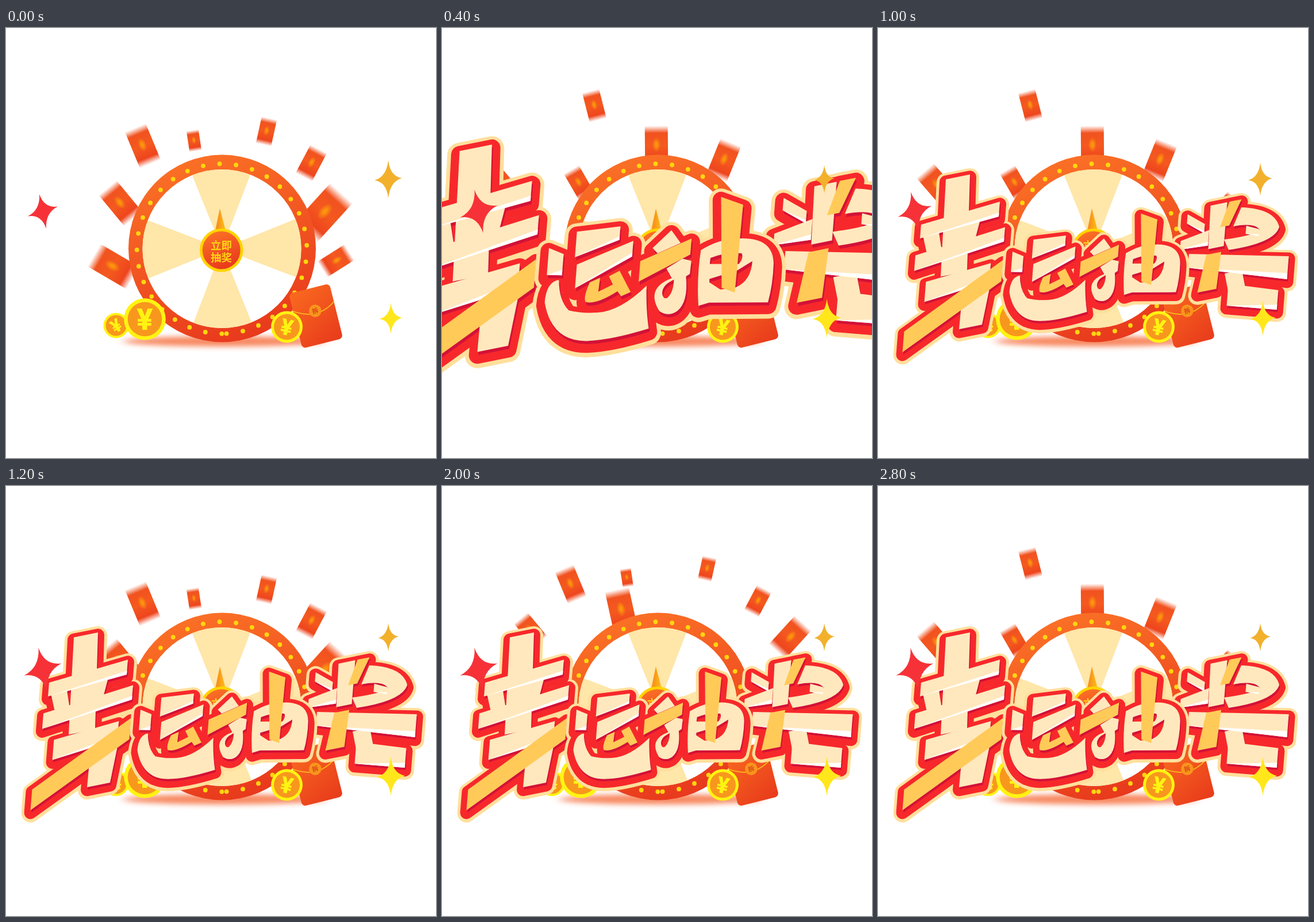
An HTML page for the animation above (3 s loop, 748 by 748 pixels).

```html
<!DOCTYPE html>
<html lang="zh">
<head>
<meta charset="utf-8">
<title>幸运抽奖</title>
<style>
html, body { margin: 0; width: 100%; height: 100%; overflow: hidden; background: #fff; }
svg { display: block; width: 100vw; height: 100vh; }
text { text-anchor: middle; }
.cjk { font-family: "Noto Sans CJK SC", "Noto Sans CJK", sans-serif; font-weight: 700; }
.yen { font-family: Inter, Roboto, sans-serif; font-weight: 800; fill: #fff312; }
</style>
</head>
<body>
<svg viewBox="0 0 748 748">
  <defs>
    <linearGradient id="ring" x1=".25" y1="0" x2=".6" y2="1">
      <stop offset="0" stop-color="#fb7226"/><stop offset="1" stop-color="#e8391d"/>
    </linearGradient>
    <linearGradient id="packet" x1=".3" y1="0" x2=".7" y2="1">
      <stop offset="0" stop-color="#f8661f"/><stop offset="1" stop-color="#e93e1c"/>
    </linearGradient>
    <linearGradient id="blurred" x1="0" y1="0" x2="0" y2="1">
      <stop offset="0" stop-color="#f1521f" stop-opacity="0"/>
      <stop offset=".18" stop-color="#f1521f"/>
      <stop offset=".5" stop-color="#f4591f"/>
      <stop offset=".82" stop-color="#ee451d"/>
      <stop offset="1" stop-color="#ee451d" stop-opacity="0"/>
    </linearGradient>
    <radialGradient id="seal">
      <stop offset=".3" stop-color="#fb940c"/><stop offset="1" stop-color="#f97a14" stop-opacity=".25"/>
    </radialGradient>
    <linearGradient id="needle">
      <stop offset=".3" stop-color="#f7951c"/><stop offset="1" stop-color="#fdc117"/>
    </linearGradient>
    <filter id="soft" x="-20%" y="-100%" width="140%" height="300%"><feGaussianBlur stdDeviation="8 5"/></filter>
  </defs>
  <g id="packets"></g>
  <g id="scene"></g>
  <g id="title"></g>
  <g id="stars"></g>
</svg>
<script>
const STEP = 200, STEPS = 15;
const CX = 375.5, CY = 384;
const MIDDLE = [375, 408];
const ZOOM = 2.17;
const el = id => document.getElementById(id);
const rad = deg => deg * Math.PI / 180;
const circle = (x, y, r, fill) => `<circle cx="${x}" cy="${y}" r="${r}" fill="${fill}"/>`;
const scaleAt = ([x, y], s) => `translate(${x} ${y}) scale(${s}) translate(${-x} ${-y})`;

// Packets leave the wheel in three waves: x, y, width
const waves = [
  [[238, 205, 39], [327, 196, 21], [453, 180, 27], [531, 235, 32],
   [199, 305, 40], [187, 415, 45], [553, 321, 52], [574, 405, 32]],
  [[312, 216, 42]],
  [[265, 135, 30], [373, 205, 40], [490, 230, 38], [238, 269, 30], [104, 274, 39], [604, 308, 24]]
];
const lean = (x, y) => .6 * Math.atan2(x - CX, CY - y) * 180 / Math.PI;

// One step of flight along the packet's own axis; low ones fly further
function fly([x, y, w]) {
  const a = rad(lean(x, y)), far = 37 + .45 * Math.max(0, y - 230);
  return [x + far * Math.sin(a), y - far * Math.cos(a), w * (1 - far / 300), lean(x, y)];
}

function flying([x, y, w, a = lean(x, y)]) {
  const h = 1.75 * w;
  return `<g transform="translate(${x} ${y}) rotate(${a})">
    <rect x="${-w / 2}" y="${-h / 2}" width="${w}" height="${h}" fill="url(#blurred)"/>
    <ellipse cy="${-h * .03}" rx="${w * .17}" ry="${h * .17}" fill="url(#seal)"/></g>`;
}

const flights = [waves[0], [...waves[0].map(fly), ...waves[1]], waves[2]];
el('packets').innerHTML = flights.map(set => `<g>${set.map(flying).join('')}</g>`).join('');

function wheel() {
  const rim = (deg, r) => `${CX + r * Math.sin(rad(deg))} ${CY - r * Math.cos(rad(deg))}`;
  let s = circle(376, 383.5, 163, 'url(#ring)') + circle(CX, CY, 138, '#fff');
  for (let a = 0; a < 360; a += 90)
    s += `<path fill="#ffe6a9" d="M${CX} ${CY}L${rim(a - 22, 138)}A138 138 0 0 1 ${rim(a + 21, 138)}Z"/>`;
  for (let k = -16; k <= 16; k++) {
    const [x, y] = rim(-1.55 + 11.15 * k, 147.8).split(' ');
    s += circle(x, y, 3.9, '#ffd60f');
  }
  return s + '<path d="M372 314L382 352H364Z" fill="url(#needle)"/>' +
    circle(374.7, 386.5, 37.8, '#ffd300') + circle(374.7, 386.5, 33, 'url(#ring)') +
    `<g class="cjk" font-size="18.5" fill="#ffd414"><text x="374.5" y="385">立即</text><text x="374.5" y="406">抽奖</text></g>`;
}

const coin = (x, y, r, turn) => circle(x, y, r, '#fff312') + circle(x, y, r * .82, '#f8971d') +
  `<text class="yen" font-size="${r * 1.4}" transform="translate(${x} ${y}) rotate(${turn})" y="${r * .52}">¥</text>`;

const packet = `<g transform="translate(539 501) rotate(-14)">
  <rect x="-36.5" y="-49" width="73" height="98" rx="7" fill="url(#packet)"/>
  <path d="M-38.5 -19Q0 9 37 -17" fill="none" stroke="#fbb01c" stroke-width="2"/>
  ${circle(1, -9, 10.8, '#f9951c')}
  <text class="cjk" x="1" y="-5" font-size="11" fill="#d8431a">拆</text></g>`;

el('scene').innerHTML =
  '<ellipse cx="380" cy="545" rx="176" ry="9" fill="#f4602a" opacity=".75" filter="url(#soft)"/>' +
  wheel() + packet + coin(191.5, 517.5, 22, -32) + coin(241.5, 506.5, 36.3, 0) + coin(488.5, 520, 27.5, 13);

// A brush stroke between two points with its width at each end.
// Flat strokes get a white wedge along the lower edge.
function bar(x1, y1, x2, y2, w1, w2, tilt = -.2) {
  const flat = Math.abs(x2 - x1) > Math.abs(y2 - y1);
  const [ux, uy] = flat ? [-.08, 1] : [1, tilt];
  const at = (x, y, w) => [x + ux * w / 2, y + uy * w / 2];
  const a = at(x1, y1, -w1), b = at(x2, y2, -w2), c = at(x2, y2, w2), d = at(x1, y1, w1);
  const poly = pts => `M${pts.join('L')}Z`;
  const cut = [0, 1].map(i => b[i] + .74 * (c[i] - b[i]));
  return { d: poly([a, b, c, d]), wedge: flat ? poly([c, d, cut]) : '' };
}
const shape = d => ({ d, wedge: '' });

const xing = {
  cream: [
    bar(139, 259, 132, 428, 42, 46),
    bar(74, 354, 211, 315, 24, 26),
    bar(92, 358, 98, 390, 28, 26),
    bar(162, 340, 155, 372, 30, 27),
    bar(64, 409, 220, 359, 27, 25),
    bar(82, 459, 195, 425, 35, 32),
    bar(170, 460, 161, 520, 47, 40)
  ],
  orange: [bar(44, 546, 216, 422, 36, 37)]
};
const jiang = {
  cream: [
    bar(538, 332, 568, 349, 16, 16),
    bar(526, 378, 575, 365, 15, 27),
    bar(593, 306, 588, 382, 29, 27),
    shape('M632 312Q690 314 698 346Q690 374 610 386L602 368Q655 361 664 351Q655 338 618 345Z'),
    bar(640, 351, 663, 356, 14, 12),
    bar(540, 405, 713, 417, 24, 40),
    bar(618, 424, 625, 460, 30, 30),
    bar(608, 464, 695, 473, 38, 34)
  ],
  orange: [bar(622, 300, 603, 345, 21, 16), bar(584, 392, 572, 457, 26, 33)]
};
// Drawn at full zoom
const yunChou = {
  cream: [
    bar(145, 357, 269, 325, 72, 38),
    bar(145, 447, 305, 369, 67, 44),
    bar(66, 405, 108, 414, 76, 60),
    shape('M97 457Q62 462 57 520Q75 628 172 629Q240 628 350 594Q342 540 344 473Q270 545 205 549Q160 552 125 543Q97 515 97 457Z'),
    shape('M361 367L414 317L440 353L375 382Z'),
    shape('M400 425L445 397L470 403L466 440L455 447Q462 520 430 545Q405 562 380 545Q340 480 415 452ZM421 456Q388 470 388 495Q390 512 402 508Q420 492 421 456Z'),
    shape('M497 373Q550 340 606 340Q700 336 702 410Q700 470 686 520L520 521L490 530Q485 450 497 373ZM524 395Q570 377 612 382Q618 396 604 412L522 412ZM521 454L600 430L642 404Q638 460 595 478L552 484L521 464Z')
  ],
  orange: [
    shape('M184 464Q165 505 172 519Q200 528 262 489L272 503L299 491L268 431L238 447L249 470L208 490L213 451Z'),
    bar(324, 433, 469, 363, 58, 45),
    bar(585, 234, 574, 486, 62, 37, .36)
  ]
};

function lettering({ cream, orange }, k) {
  const all = [...cream, ...orange];
  const paths = list => list.map(s => `<path d="${s.d}"/>`).join('');
  const back = (color, width, dy) => `<g fill="${color}" stroke="${color}" stroke-width="${width * k}"
    stroke-linejoin="round" transform="translate(0 ${dy * k})">${paths(all)}</g>`;
  return back('#ffdf9c', 32, 5.2) + back('#f7282b', 22, 4.4) + `<g fill-rule="evenodd">
    <g fill="#d21238" transform="translate(${1.5 * k} ${4 * k})">${paths(all)}</g>
    <g fill="#ffe8bd">${paths(cream)}</g>
    <path fill="#fff" fill-rule="nonzero" d="${cream.map(s => s.wedge).join('')}"/>
    <g fill="#ffca58">${paths(orange)}</g></g>`;
}

// The first character enters smaller and from further left
const words = [
  { art: lettering(xing, 1), pivot: [417, 378], pop: 1.77 },
  { art: lettering(jiang, 1), pivot: MIDDLE, pop: ZOOM },
  { art: `<g transform="${scaleAt(MIDDLE, 1 / ZOOM)}">${lettering(yunChou, ZOOM)}</g>`, pivot: MIDDLE, pop: ZOOM }
];
el('title').innerHTML = words.map(w => `<g>${w.art}</g>`).join('');

// Unit star placed by its right tip (rx, ry) and bottom tip (bx, by)
const stars = [
  { color: '#f63238', x: 64, y: 319, rx: 26, ry: -8.5, bx: 6, by: 30, grow: .25 },
  { color: '#f2b02c', x: 665, y: 263, rx: 24, ry: -2, bx: 0, by: 33, grow: -.26 },
  { color: '#ffe71c', x: 669.5, y: 505, rx: 19.5, ry: -1, bx: 0, by: 27, grow: .26 }
];
el('stars').innerHTML = stars.map(s =>
  `<path fill="${s.color}" d="M0 -1Q.13 -.13 1 0Q.13 .13 0 1Q-.13 .13 -1 0Q-.13 -.13 0 -1Z"/>`).join('');

function draw(ms) {
  const n = Math.floor(ms / STEP) % STEPS;
  [...el('packets').children].forEach((g, i) => g.setAttribute('display', i === n % 3 ? 'inline' : 'none'));

  const pulse = 1 - Math.abs(n % 4 - 2) / 2;
  [...el('stars').children].forEach((path, i) => {
    const s = stars[i], k = 1 + s.grow * pulse;
    path.setAttribute('transform', `matrix(${s.rx * k} ${s.ry * k} ${s.bx * k} ${s.by * k} ${s.x} ${s.y})`);
  });

  el('title').setAttribute('display', n ? 'inline' : 'none');
  [...el('title').children].forEach((g, i) => {
    const w = words[i];
    g.setAttribute('transform', n === 1 ? scaleAt(w.pivot, w.pop) : scaleAt(MIDDLE, n === 2 ? 1.34 : 1));
  });
}

const start = performance.now();
function tick() {
  draw(performance.now() - start);
  requestAnimationFrame(tick);
}
tick();
</script>
</body>
</html>
```
